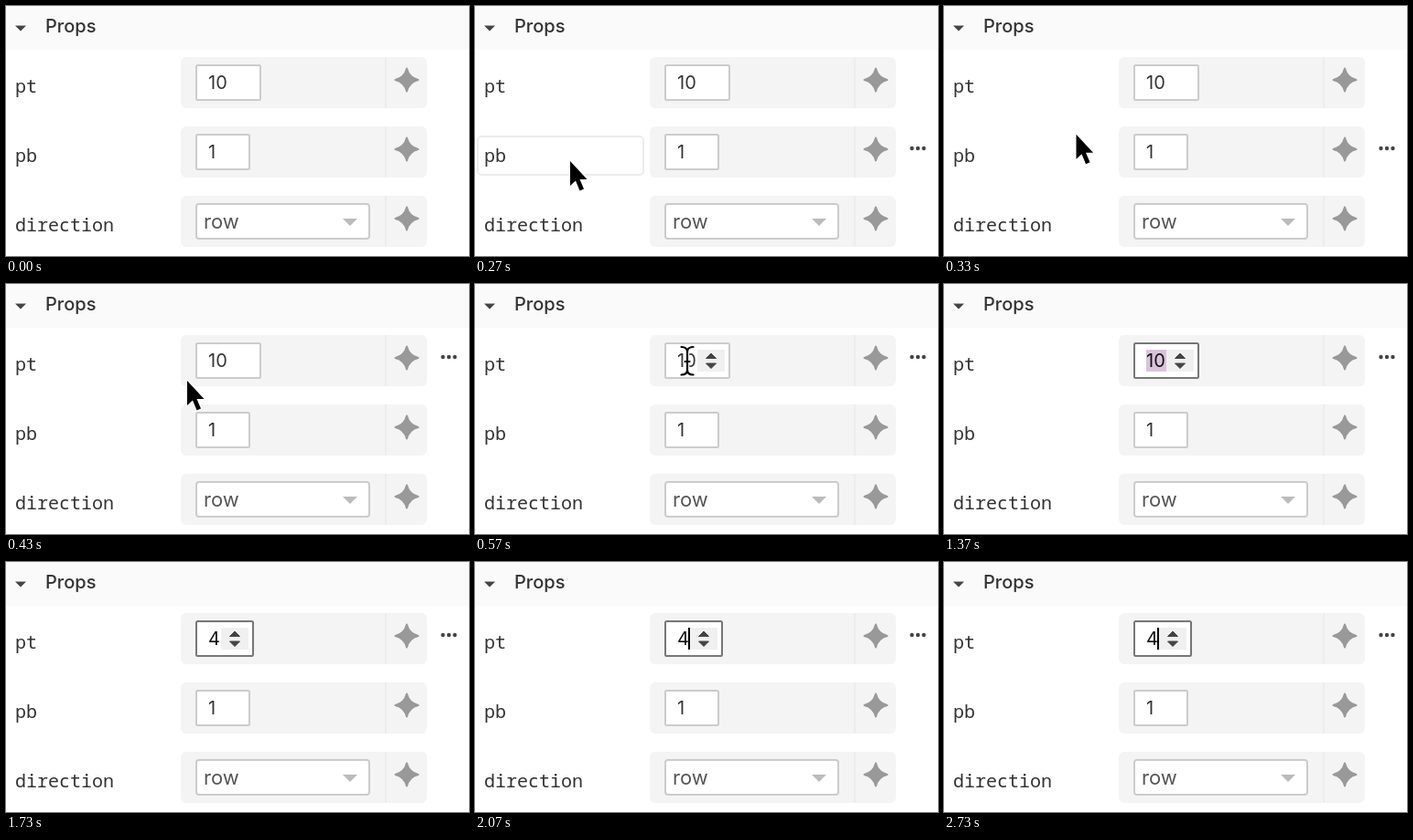
These frames come from a looping animation (506 by 274 pixels, 2900 ms). An HTML page:

```html
<!DOCTYPE html>
<html lang="en">
<head>
<meta charset="utf-8">
<title>Props panel</title>
<style>
  html, body { margin: 0; width: 100%; height: 100%; overflow: hidden; background: #fff; }
  svg { display: block; width: 100vw; height: 100vh; }
  text { font: 20px Inter, "Open Sans", sans-serif; fill: #333; }
  .title { font-weight: 500; }
  .label { font-family: "Noto Sans Mono", "DejaVu Sans Mono", monospace; }
  .choice { font-size: 22px; fill: #555; }
  .field { fill: #fff; stroke: #ccc; stroke-width: 2; }
</style>
</head>
<body>
<svg viewBox="0 0 506 274">
  <defs>
    <g id="row">
      <rect x="191" y="-28" width="269" height="56" rx="6" fill="#f4f4f4"/>
      <rect x="414" y="-28" width="2" height="56" fill="#ededed"/>
      <path transform="translate(438 -3)" fill="#999" stroke="#999" stroke-width="2" stroke-linejoin="round"
        d="M0-12.5Q2.5-2.5 12.5 0Q2.5 2.5 0 12.5Q-2.5 2.5-12.5 0Q-2.5-2.5 0-12.5Z"/>
    </g>
    <path id="beamShape" fill="none" stroke-linecap="round"
      d="M-6.5-15Q0-15 0-9.5Q0-15 6.5-15M0-9.5V10M-6.5 15.5Q0 15.5 0 10Q0 15.5 6.5 15.5M-2.5 1H2.5"/>
  </defs>

  <rect width="506" height="48" fill="#fafafa"/>
  <path d="M10 21.5H22L16 27.5Z" fill="#444"/>
  <text class="title" x="43" y="29">Props</text>

  <use href="#row" y="84"/>
  <use href="#row" y="160"/>
  <use href="#row" y="236"/>
  <rect id="labelBox" x="3" width="181" height="42" rx="4" fill="#fff" stroke="#ececec" stroke-width="2"/>
  <text class="label" x="10" y="95">pt</text>
  <text class="label" x="10" y="171">pb</text>
  <text class="label" x="10" y="247">direction</text>

  <rect id="ptField" class="field" x="208" y="65" height="38" rx="1.5"/>
  <rect id="selection" x="221" y="72" width="22" height="24" fill="#d9c3dc"/>
  <text id="ptValue" x="221" y="91"></text>
  <g id="spinner">
    <rect x="-15" y="72" width="30" height="24" fill="#f0f0f0"/>
    <path d="M-5.5 81.5H5.5L0 76ZM-5.5 87H5.5L0 92.5Z" fill="#444" stroke="#444" stroke-linejoin="round"/>
  </g>
  <rect id="caret" x="233" y="72" width="2" height="24" fill="#000"/>

  <rect class="field" x="208" y="141" width="58" height="38" rx="1.5"/>
  <text x="221" y="167">1</text>
  <rect class="field" x="208" y="217" width="189" height="38" rx="3"/>
  <text class="choice" x="216" y="244">row</text>
  <path d="M368 233H384L376 241Z" fill="#bbb"/>

  <g id="dots" fill="#444">
    <circle cx="477.5" r="2.2"/><circle cx="484" r="2.2"/><circle cx="490.5" r="2.2"/>
  </g>

  <path id="arrow" d="M0 0V27L6 21.5L10.5 32.5L15 30.5L10.5 20H18.5Z"
    fill="#000" stroke="#fff" stroke-width="3" paint-order="stroke" stroke-linejoin="round"/>
  <g id="beam">
    <use href="#beamShape" stroke="#fff" stroke-width="4.5"/>
    <use href="#beamShape" stroke="#000" stroke-width="2.2"/>
  </g>
</svg>
<script>
const LOOP = 2900, TICK = 100 / 3, ROW = 76;
const $ = id => document.getElementById(id);
const show = (id, on) => $(id).setAttribute("visibility", on ? "visible" : "hidden");
const place = (id, x, y) => $(id).setAttribute("transform", `translate(${x} ${y})`);

// Pointer keys: time, x, y
const approach = [[170, 0, 238], [270, 104, 170], [350, 158, 131], [430, 198, 106], [500, 222, 91], [570, 232, 84]];
const drag = [[730, 232, 84], [829, 232, 84], [830, 150, 62], [870, 92, 45]];

function along(keys, t) {
  if (t >= keys.at(-1)[0]) return keys.at(-1).slice(1);
  const i = keys.findIndex(k => k[0] > t);
  const [t0, x0, y0] = keys[i - 1], [t1, x1, y1] = keys[i];
  const u = (t - t0) / (t1 - t0);
  return [x0 + (x1 - x0) * u, y0 + (y1 - y0) * u];
}

// Motion advances thirty times a second on a 10 ms clock.
function snap(t) {
  const at = k => Math.round(k * TICK / 10) * 10;
  const k = Math.floor(t / TICK + 0.2);
  return at(k) > t ? at(k - 1) : at(k);
}

function draw(time) {
  const t = snap(time);
  const pointing = t >= 170 && t < 900;
  const [x, y] = pointing ? along(t < 730 ? approach : drag, t) : [232, 84];
  const overField = x > 207 && x < 279 && y > 64 && y < 104;
  const focused = t >= 730, typed = t >= 1400;
  const useBeam = focused || overField;

  show("arrow", pointing && !useBeam);
  show("beam", pointing && useBeam);
  place("arrow", x, y);
  place("beam", x, y);

  const row = focused ? 0 : Math.floor((y - 48) / ROW);
  show("dots", t >= 170);
  place("dots", 0, 80 + row * ROW);
  const boxTop = 67 + row * ROW;
  show("labelBox", pointing && !focused && x > 3 && x < 185 && y >= boxTop && y <= boxTop + 42);
  $("labelBox").setAttribute("y", boxTop);

  const right = typed ? 271 : 279;
  $("ptField").setAttribute("width", right - 209);
  $("ptField").style.stroke = focused ? "#777" : "#ccc";
  $("ptValue").textContent = typed ? "4" : "10";
  $("ptValue").style.fill = focused ? "#111" : "#333";
  show("spinner", focused || pointing && overField);
  place("spinner", right - 21, 0);
  show("selection", t >= 830 && !typed);
  show("caret", typed && Math.floor((t - 1400 + 5) / (10 * TICK)) % 2 === 0);
}

const start = performance.now();
function frame() {
  draw((performance.now() - start) % LOOP);
  requestAnimationFrame(frame);
}
draw(0);
requestAnimationFrame(frame);
</script>
</body>
</html>
```
